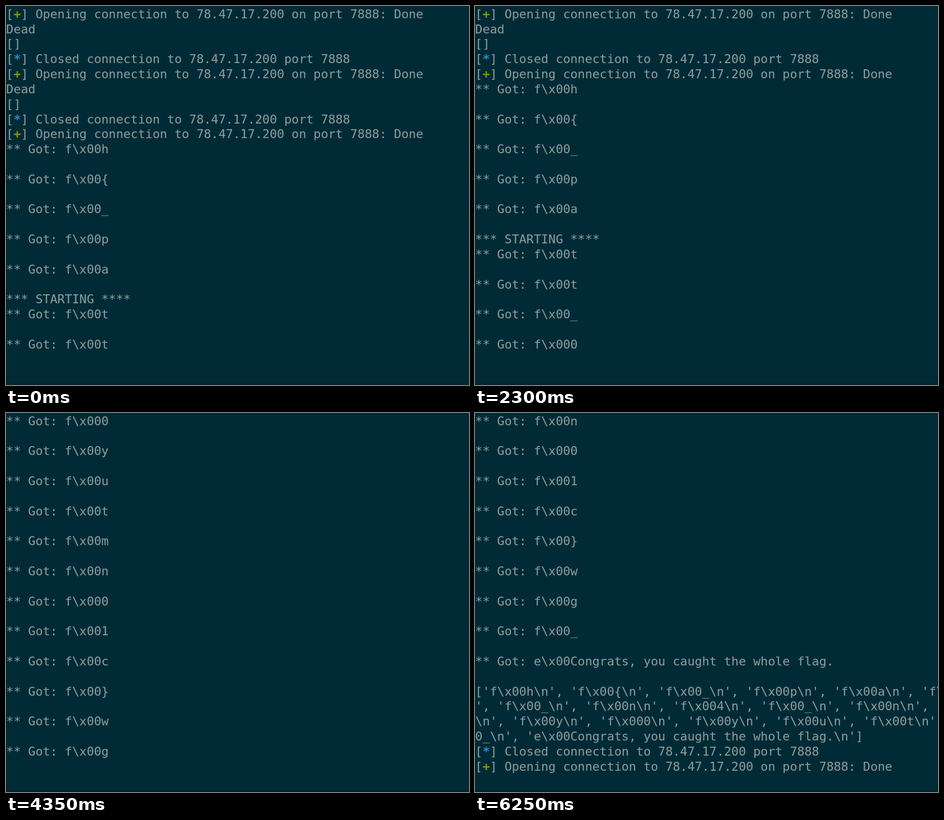
An HTML page with a canvas for the animation above (6350 ms loop, 827 by 677 pixels).

```html
<!DOCTYPE html>
<html lang="en">
<head>
<meta charset="utf-8">
<title>Terminal log</title>
<style>
  html, body { margin: 0; width: 100%; height: 100%; overflow: hidden; background: #002b36; }
  canvas { display: block; }
</style>
</head>
<body>
<canvas id="stage" width="827" height="677"></canvas>
<script>
const ctx = document.getElementById('stage').getContext('2d');
const LOOP = 6350, ROWS = 24, COLS = 166;
const CELL = 13.07, PITCH = 26.82, LEFT = 0.4, BASE = 21.8, SIZE = 21.8;
const BG = '#002b36', EDGE = '#002530', FG = '#8f9e9f', GREEN = '#859900', BLUE = '#268bd2';
const MONO = '"DejaVu Sans Mono", monospace';

// Everything the terminal prints, line by line
const HOST = '78.47.17.200';
const OPEN = `[+] Opening connection to ${HOST} on port 7888: Done`;
const CLOSED = `[*] Closed connection to ${HOST} port 7888`;
const LETTERS = 'h{_patt_0r3' + '4sn' + '_n4_n' + '3c_r0tku4' + 'y0yutmn01c}wg_';
const items = [...LETTERS].map(c => 'f\\x00' + c);
items.push('e\\x00Congrats, you caught the whole flag.');

const log = [OPEN, 'Dead', '[]', CLOSED, OPEN, 'Dead', '[]', CLOSED, OPEN];
items.forEach((item, i) => {
  if (i === 5) log.push('*** STARTING ****');
  log.push('** Got: ' + item, '');
});
const list = '[' + items.map(s => `'${s}\\n'`).join(', ') + ']';
for (let i = 0; i < list.length; i += COLS) log.push(list.slice(i, i + COLS));
log.push(CLOSED, OPEN);

const upTo = item => 2 * item + 12;   // lines printed once this item is shown
const END = log.length;
const steps = [
  [5150, END], [4950, END - 1], [4550, END - 2],
  [4450, upTo(41)], [4350, upTo(40)], [4250, upTo(39)], [3750, upTo(37)],
  [3200, t => upTo(10 + Math.floor(Math.floor((t - 3200) / 50) * 2.5))],
  [2850, upTo(9)], [2150, upTo(8)], [1250, upTo(7)], [0, upTo(6)]
];

function printed(t) {
  const n = steps.find(s => t >= s[0])[1];
  return typeof n === 'function' ? n(t) : n;
}

function drawLine(text, row) {
  const y = BASE + row * PITCH;
  const tag = /^\[[+*]\]/.test(text);
  const end = Math.min(text.length, 64);
  for (let i = 0; i < end; i++) {
    const c = text[i], mark = tag && i === 1;
    ctx.font = `${mark ? 'bold ' : ''}${SIZE}px ${MONO}`;
    ctx.fillStyle = !mark ? FG : c === '+' ? GREEN : BLUE;
    ctx.fillText(c, LEFT + (i + 0.5) * CELL, y);
  }
}

let shown = -1;
function draw(count) {
  ctx.fillStyle = BG;
  ctx.fillRect(0, 0, 827, 677);
  ctx.fillStyle = EDGE;
  ctx.fillRect(0, 673, 827, 4);
  ctx.textAlign = 'center';
  ctx.textBaseline = 'alphabetic';
  log.slice(count - ROWS, count).forEach(drawLine);
  shown = count;
}

const start = performance.now();
function tick() {
  const count = printed((performance.now() - start) % LOOP);
  if (count !== shown) draw(count);
  requestAnimationFrame(tick);
}
tick();
</script>
</body>
</html>
```
